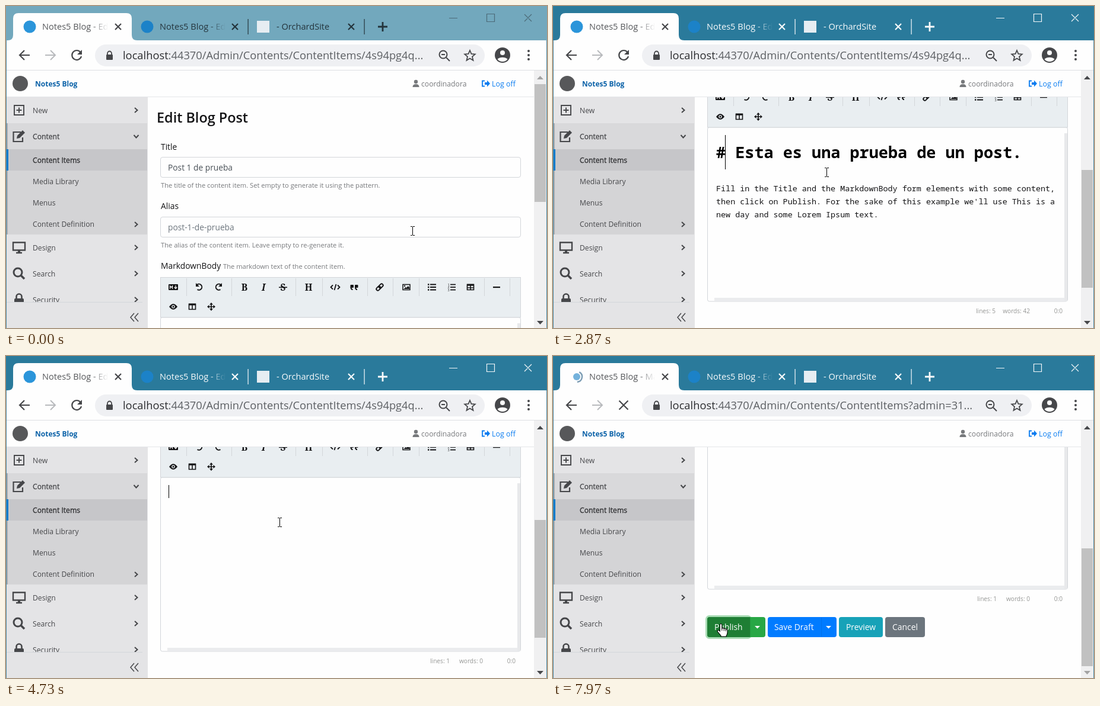
These frames come from a looping animation (912 by 544 pixels, 8 s). An HTML page:

```html
<!DOCTYPE html>
<html lang="en">
<head>
<meta charset="utf-8">
<title>Edit Blog Post</title>
<style>
  html, body { margin: 0; width: 100%; height: 100%; overflow: hidden; background: #fefefe; }
  svg { display: block; width: 912px; height: 544px; font-family: "Open Sans", "Noto Sans", sans-serif; }
  text { white-space: pre; }
  .mono { font-family: "Noto Sans Mono", "DejaVu Sans Mono", monospace; }
  .serif { font-family: "Noto Serif", serif; font-weight: 700; }
  #win { --bar: #2a7a9b; --ink: #f8fafb; --ctl: #f2f6f8; }
  #win.idle { --bar: #72a8bd; --ink: #24343c; --ctl: #4c6a78; }
</style>
</head>
<body>
<svg id="win" viewBox="0 0 912 544"></svg>
<script>
const LOOP = 8000;
const WHITE = '#fefefe', PALE = '#e4e4e6', TOOLBAR = '#e9eef1', DARK = '#46474a', GREY = '#77797c',
  EDGE = '#d3d6da', BLACK = '#141416', SELECTED = '#d2d2d3', STATUS = '#959694', BLUE = '#0a7cf0';

const rect = (x, y, w, h, fill, more = '') =>
  `<rect x="${x}" y="${y}" width="${w}" height="${h}" fill="${fill}" ${more}/>`;
const text = (x, y, s, size, fill, more = '') =>
  `<text x="${x}" y="${y}" font-size="${size}" fill="${fill}" ${more}>${s}</text>`;
const line = (d, color, width = 2, more = '') =>
  `<path d="${d}" fill="none" stroke="${color}" stroke-width="${width}" ${more}/>`;
const shape = (d, fill, more = '') => `<path d="${d}" fill="${fill}" ${more}/>`;
const dot = (x, y, r, fill) => `<circle cx="${x}" cy="${y}" r="${r}" fill="${fill}"/>`;
const ring = (x, y, r, color, width) =>
  `<circle cx="${x}" cy="${y}" r="${r}" fill="none" stroke="${color}" stroke-width="${width}"/>`;
const group = (x, y, body, flip = 1) => `<g transform="translate(${x} ${y}) scale(${flip} 1)">${body}</g>`;
const cross = (x, y, r, color, w) =>
  line(`M${x - r} ${y - r}l${2 * r} ${2 * r}m0 ${-2 * r}l${-2 * r} ${2 * r}`, color, w);
const END = 'text-anchor="end"', MID = 'text-anchor="middle"';

const fade = (id, x, color) =>
  `<linearGradient id="${id}" gradientUnits="userSpaceOnUse" x1="${x}" x2="${x + 30}" y1="0" y2="0">
    <stop offset="0" style="stop-color:${color}"/><stop offset="1" style="stop-color:${color};stop-opacity:0"/>
  </linearGradient>`;

const defs = `<defs>
  ${fade('fade1', 142, '#55575a')}${fade('fade2', 340, 'var(--ink)')}
  <clipPath id="page"><rect x="239" y="154" width="651" height="390"/></clipPath>
  <clipPath id="menu"><rect x="0" y="154" width="239" height="346"/></clipPath>
</defs>`;

function browser() {
  const ink = 'var(--ink)', ctl = 'var(--ctl)';
  return rect(0, 0, 912, 59, 'var(--bar)') +
    shape('M3 58Q12 58 12 49V21Q12 12 21 12H203Q212 12 212 21V49Q212 58 221 58Z', WHITE) +
    `<g id="fav">${dot(40, 35, 10.5, '#2b95da')}</g>` +
    `<g id="spin">${dot(40, 35, 6, '#74b2dc')}${line('M40 26A9 9 0 0 1 45 42.5', '#7d9db4', 2.4, 'id="arc"')}</g>` +
    text(61, 40, '', 14.6, 'url(#fade1)', 'id="tab"') + cross(189, 35, 5, DARK, 2.2) +
    dot(238, 35, 10.5, '#1c82c8') +
    text(259, 40, 'Notes5 Blog - Edit', 14.6, 'url(#fade2)') + cross(386, 35, 5, ink, 2.2) +
    rect(423, 25, 21, 20, '#e6edf2') +
    text(456, 40, '- OrchardSite', 14.6, ink) + cross(582, 35, 5, ink, 2.2) +
    rect(407.5, 22, 1.2, 26, ink) + rect(603.5, 22, 1.2, 26, ink) +
    line('M627 35h16M635 27v16', ink, 2.8) +
    line('M747 20.5h14M810.5 13.5h13v13h-13zM874 14l12 12m0-12l-12 12', ctl, 1.2) +
    rect(0, 58, 912, 50, WHITE) + rect(0, 108, 912, 1, '#dddfe2') +
    line('M40 83H23m8-8l-8 8 8 8', DARK, 2.2) + line('M66 83h17m-8-8l8 8-8 8', '#b8babd', 2) +
    `<g id="reload">${line('M125.5 78A8 8 0 1 0 127 85', DARK, 2.2)}${shape('M128 74v8h-8z', DARK)}</g>` +
    `<g id="stop">${cross(119, 83, 7.5, DARK, 2.2)}</g>` +
    rect(150, 65, 657, 37, '#eff0f3', 'rx="18.5"') +
    rect(169, 82, 11, 9, DARK, 'rx="1"') + line('M171 82v-2a3.5 3.5 0 0 1 7 0v2', DARK, 1.8) +
    text(197, 90, '<tspan fill="#2b2c2f">localhost</tspan><tspan id="path"></tspan>', 18.3, '#5c5f63') +
    line('M742 87l6 6M734 82h6', DARK, 2) + ring(737, 82, 6.5, DARK, 2) +
    line('M782 75l2.5 5.8 6.3.6-4.8 4.2 1.5 6.2-5.5-3.3-5.5 3.3 1.5-6.2-4.8-4.2 6.3-.6z', DARK, 1.8) +
    dot(837, 83, 13, DARK) + dot(837, 79, 4, WHITE) + shape('M828.5 90a10 7 0 0 1 17 0a11 11 0 0 1-17 0z', WHITE) +
    [76, 83, 90].map(y => dot(881, y, 2, DARK)).join('');
}

function header() {
  return rect(0, 109, 890, 45, WHITE) + rect(0, 153, 890, 1, '#e4e6e9') +
    dot(24, 131, 13, '#57585a') +
    text(49, 136, 'Notes5 Blog', 12, '#0b62a8', 'font-weight="700"') +
    dot(691, 128, 3.2, GREY) + shape('M685.5 137q0-5 5.500-5t5.500 5z', GREY) +
    text(700, 136, 'coordinadora', 12.2, GREY) +
    shape('M807 129h4v-3.500l5 5.500-5 5.500v-3.500h-4z', BLUE) + line('M807 126.500h-4v9h4', BLUE, 1.8) +
    text(819, 136, 'Log off', 12.4, BLUE);
}

function sidebar() {
  const chevron = y => line(`M217 ${y - 4}l4.500 4-4.500 4`, DARK, 2);
  const entry = (y, s, more = '') => text(45, y + 5, s, 12.15, DARK, more);
  const icons =
    line('M14 168h16v16h-16zM22 171.500v9M17.500 176h9', DARK, 1.9) +
    line('M25 213H12.500v16H28v-7', DARK, 2.2) + shape('M18 224l1-5 9-9 4 4-9 9z', DARK) +
    line('M12 399.500h20v13H12zM17 417h10', DARK, 2.4) + rect(20, 412, 4, 5, DARK) +
    ring(20, 450, 7, DARK, 3) + line('M25 455l6 6', DARK, 3.6) +
    rect(14, 494, 16, 12, DARK, 'rx="2"') + line('M17.500 494v-3a4.500 4.500 0 0 1 9 0v3', DARK, 2.6);
  return rect(0, 154, 239, 390, PALE) +
    rect(0, 198, 238, 44, '#d9d9db') + rect(0, 242, 238, 144, '#d4d4d6') + rect(0, 242, 238, 36, '#c6c6c9') +
    rect(0, 198, 3, 188, '#a9acb1') + rect(0, 242, 4, 36, '#0a7acc') +
    `<g clip-path="url(#menu)">${icons}` +
    entry(176, 'New') + entry(220, 'Content', `stroke="${DARK}" stroke-width=".3"`) +
    entry(260, 'Content Items', `stroke="${BLACK}" stroke-width=".3"`) +
    entry(296, 'Media Library') + entry(332, 'Menus') + entry(368, 'Content Definition') +
    entry(408, 'Design') + entry(452, 'Search') + entry(496, 'Security') +
    [176, 369, 408, 452, 496].map(chevron).join('') + line('M215.500 218l4 4.500 4-4.500', DARK, 2) + '</g>' +
    rect(0, 500, 230, 1, EDGE) + line('M216 519l-6 7 6 7m7-14l-6 7 6 7', DARK, 1.5);
}

function tools() {
  const ic = (x, body) => group(x, 475, body);
  const letter = (x, s, more = '') => text(x, 481, s, 15.5, BLACK, `class="serif" ${MID} ${more}`);
  const turn = line('M-4-4A5 5 0 1 1-3.500 4', BLACK, 1.9) + shape('M-6-7v6h6z', BLACK);
  const quote = x => rect(x, -4, 5.500, 5, BLACK, 'rx="1"') + line(`M${x + 1} 0q0 4 3 4`, BLACK, 2);
  const rows = [-4.5, 0, 4.5].map(y => rect(-3, y - 1, 10, 2, BLACK) + rect(-7, y - 1.2, 2.4, 2.4, BLACK)).join('');
  const nums = [-4.5, 0, 4.5].map((y, i) => rect(-2, y - .8, 9, 1.7, BLACK) + text(-6.5, y + 2, i + 1, 5.5, BLACK)).join('');
  const cols = line('M-5.500-4.500h11v9h-11zM0-4v8', BLACK, 1.6) + rect(-6, -5.3, 12, 3, BLACK);
  const sides = [0, 90, 180, 270].map(a => shape('M0-7l3 3.500h-6z', BLACK, `transform="rotate(${a})"`)).join('');
  const oval = a => `<rect x="-7" y="-2.500" width="8" height="5" rx="2.500" fill="none" stroke="${BLACK}" stroke-width="1.9" transform="rotate(${a})"/>`;
  return rect(260.5, 458.5, 607, 67.500, TOOLBAR, `stroke="${EDGE}"`) +
    ic(282, rect(-8, -5, 16, 10, BLACK, 'rx="1"') + line('M-5.500 3v-5l2 2.500 2-2.500v5M4-3v5m-2.200-2l2.200 2.500 2.200-2.500', WHITE, 1.2)) +
    ic(326, turn) + group(358, 475, turn, -1) +
    letter(402, 'B') + letter(434, 'I', 'font-style="italic"') + letter(467, 'S') + rect(460, 474.5, 14, 1.6, BLACK) + letter(510, 'H') +
    ic(555, line('M-4-3.500l-3.500 3.500 3.500 3.500M4-3.500l3.500 3.500-3.500 3.500M1.500-5l-3 10', BLACK, 1.8)) +
    ic(587, quote(-6.5) + quote(1)) + ic(630, oval(-45) + oval(135)) +
    ic(675, line('M-6-4.500h12v9h-12z', BLACK, 1.5) + shape('M-4.500 3l3-3 1.500 1 3-3 2 3v2z', BLACK) + dot(-3, -2, 1.2, BLACK)) +
    ic(718, rows) + ic(751, nums) + ic(783, cols + rect(-5, .3, 10, 1.4, BLACK)) + ic(827, rect(-6, -1, 12, 2.2, BLACK)) +
    [304, 380, 488, 533, 609, 652, 696, 806, 849].map(x => rect(x, 460, 1, 30, EDGE)).join('') +
    group(282, 508, shape('M-7 0Q0-9.500 7 0Q0 9.500-7 0z', BLACK) + dot(0, 0, 2.8, TOOLBAR) + dot(0, 0, 1.5, BLACK)) +
    group(314, 508, cols) + group(346, 508, line('M-5 0h10M0-5v10', BLACK, 1.7) + sides);
}

function form() {
  const field = (y, s, color) => rect(260.5, y, 607, 34, WHITE, `stroke="${EDGE}" rx="3.500"`) + text(273, y + 22.5, s, 13.75, color);
  const help = (x, y, s) => text(x, y, s, 11.15, GREY);
  const status = (id, x) => text(x, 840, '', 10.15, STATUS, `id="${id}" ${END}`);
  const body = ['Fill in the Title and the MarkdownBody form elements with some content,',
    'then click on Publish. For the sake of this example we\'ll use This is a',
    'new day and some Lorem Ipsum text.'];
  const button = (x, w, fill, s, tx, split) =>
    rect(x, 867, w, 34, fill, 'rx="4"') + text(tx, 889, s, 13.9, WHITE) +
    (split ? rect(split, 868, 1, 32, 'rgba(0,0,0,.08)') + shape(`M${x + w - 18} 882h9l-4.500 4.500z`, WHITE) : '');
  return text(254, 197, 'Edit Blog Post', 23.4, BLACK, 'font-weight="600"') +
    text(261, 243, 'Title', 13.8, BLACK) + field(255.5, 'Post 1 de prueba', '#495057') +
    help(261, 307, 'The title of the content item. Set empty to generate it using the pattern.') +
    text(261, 343, 'Alias', 13.8, BLACK) + field(356.5, 'post-1-de-prueba', '#6c757d') +
    help(261, 408, 'The alias of the content item. Leave empty to re-generate it.') +
    text(261, 444, 'MarkdownBody', 13.8, BLACK) + help(366, 444, 'The markdown text of the content item.') +
    rect(260.5, 526, 607, 294, WHITE, `stroke="${EDGE}" rx="3"`) + tools() +
    rect(862, 536, 5, 284, '#e8e9eb') + rect(272, 814, 590, 5, '#ebecee') +
    rect(274, 539, 580, 0, SELECTED, 'id="sel"') + rect(274, 663, 275, 22, SELECTED, 'id="selEnd"') +
    `<g id="doc" class="mono">` + text(275, 578, '# Esta es una prueba de un post.', 26.85, '#000', 'font-weight="600"') +
    body.map((s, i) => text(275, 634 + 22 * i, s, 13.41, BLACK)).join('') + '</g>' +
    rect(290, 539, 1, 58, '#000', 'id="caret"') +
    status('lines', 746) + status('words', 804) + status('pos', 859) +
    rect(258.5, 865.5, 75, 37, 'none', 'id="ring" rx="5" stroke="#a9dcb5" stroke-width="3"') +
    button(260, 98, '#28a745', 'Publish', 272, 332) +
    `<g id="press">${shape('M264 867h68v34h-68q-4 0-4-4v-26q0-4 4-4z', '#1e7e34')}${text(272, 889, 'Publish', 13.9, WHITE)}</g>` +
    button(362, 116, '#007bff', 'Save Draft', 373, 452) +
    button(482, 74, '#17a2b8', 'Preview', 494) + button(560, 67, '#6c757d', 'Cancel', 572);
}

const scrollbar = () => rect(890, 109, 21, 435, '#f0f0f1') + rect(891, 132, 19, 199, '#c1c1c1', 'id="thumb"') +
  shape('M895 124l5.500-6 5.500 6z', DARK, 'id="up"') + shape('M895 532l5.500 6 5.500-6z', DARK, 'id="down"') +
  rect(0, 58, 1, 486, '#4d8ba6') + rect(911, 58, 1, 486, '#4d8ba6');

const pointers = '<g id="mouse">' +
  `<g id="ibeam">${line('M-3-7.500h3M1-7.500h3M.5-7v14M-3 7.500h3M1 7.500h3', '#000', 1)}</g>` +
  `<g id="arrow">${shape('M0 0V16l3.800-3.500 2.500 6 2.600-1.100-2.500-5.900H11.500z', '#fff', 'stroke="#000" stroke-width="1"')}</g>` +
  `<g id="hand">${shape('M-1.700 1.500q0-2 1.700-2t1.800 2V7q3-1 3.500.6 2.500-.8 3 .9 2.700-.5 2.700 2V14q0 3-1.800 5.500V21H0v-1.500L-5.300 13q-1.200-2 .6-2.700 1.400-.3 3 1.700z', '#fff', 'stroke="#000" stroke-width="1.1"')}${line('M1.800 7v4M5.300 8v3.500M8.300 9v3', '#000', 1)}</g></g>`;

const win = document.getElementById('win');
win.innerHTML = defs + `<g clip-path="url(#page)">${rect(239, 154, 651, 390, WHITE)}<g id="scroll">${form()}</g></g>` +
  sidebar() + header() + browser() + scrollbar() + pointers;

const $ = Object.fromEntries([...win.querySelectorAll('[id]')].map(e => [e.id, e]));
const show = (id, on) => $[id].setAttribute('display', on ? 'inline' : 'none');
const label = (id, s) => { if ($[id].textContent !== s) $[id].textContent = s; };

const ACTIVATE = 950, FOCUS = 2600, ERASE = 4700, CLICK = 7200, LOADED = 7900, BLINK = 530;
// Rows: start, end, then the values reached at the end.
const MOVE = [[0, 0, 685, 380], [30, 850, 351, 412], [2100, 2500, 461, 281], [5400, 5450, 459, 281], [5850, 6750, 283, 453]];
const SCROLL = [[0, 0, 0], [1530, 2050, 321], [5400, 5650, 426]];
// Rows: start, value.
const POINTER = [[0, 'ibeam'], [400, 'arrow'], [1800, 'ibeam'], [5450, 'arrow'], [6650, 'hand']];
const SELECT = [[0, 0, '0:0'], [3300, 58, '1:0'], [3520, 80, '2:0'], [3760, 102, '2:72'], [3980, 124, '2:144'], [4250, 124, '2:178'], [ERASE, 0, '0:0']];

const inOut = p => p * p * (3 - 2 * p);
const pick = (rows, t) => rows.filter(r => r[0] <= t).pop();

function tween(rows, t) {
  const i = rows.indexOf(pick(rows, t)), [a, b, ...to] = rows[i];
  if (t >= b) return to;
  const from = rows[i - 1].slice(2), p = inOut((t - a) / (b - a));
  return to.map((v, k) => from[k] + (v - from[k]) * p);
}

function draw(t) {
  const [x, y] = tween(MOVE, t), [top] = tween(SCROLL, t);
  const kind = pick(POINTER, t)[1], [since, height, pos] = pick(SELECT, t);
  const empty = t >= ERASE, busy = t >= CLICK, loaded = t >= LOADED;

  win.classList.toggle('idle', t < ACTIVATE);
  $.mouse.setAttribute('transform', `translate(${Math.round(x)} ${Math.round(y)})`);
  for (const id of ['ibeam', 'arrow', 'hand']) show(id, id === kind);
  $.scroll.setAttribute('transform', `translate(0 ${-Math.round(top)})`);
  $.thumb.setAttribute('y', Math.round(132 + top * .452));
  $.up.setAttribute('fill', top < 1 ? '#a3a3a3' : DARK);
  $.down.setAttribute('fill', t > 5800 ? '#a3a3a3' : DARK);

  $.sel.setAttribute('height', height);
  show('selEnd', pos === '2:178');
  show('doc', !empty);
  const age = t - Math.max(since, FOCUS);
  show('caret', age >= 0 && height === 0 && Math.floor(age / BLINK) % 2 === 0);
  $.caret.setAttribute('x', empty ? 274 : 290);
  $.caret.setAttribute('height', empty ? 22 : 58);
  $.lines.setAttribute('x', empty ? 748 : 746);
  label('lines', empty ? 'lines: 1' : 'lines: 5');
  label('words', empty ? 'words: 0' : 'words: 42');
  label('pos', pos);

  show('press', kind === 'hand');
  show('ring', busy);
  show('fav', !busy);
  show('spin', busy);
  show('reload', !busy);
  show('stop', busy);
  $.arc.setAttribute('transform', `rotate(${(t - LOADED) * (loaded ? .4 : -.2)} 40 35)`);
  label('tab', loaded ? 'Notes5 Blog - Manage' : 'Notes5 Blog - Edit');
  label('path', ':44370/Admin/Contents/ContentItems' + (loaded ? '?admin=31...' : '/4s94pg4q...'));
}

const begin = performance.now();
function tick() {
  draw((performance.now() - begin) % LOOP);
  requestAnimationFrame(tick);
}
tick();
</script>
</body>
</html>
```
